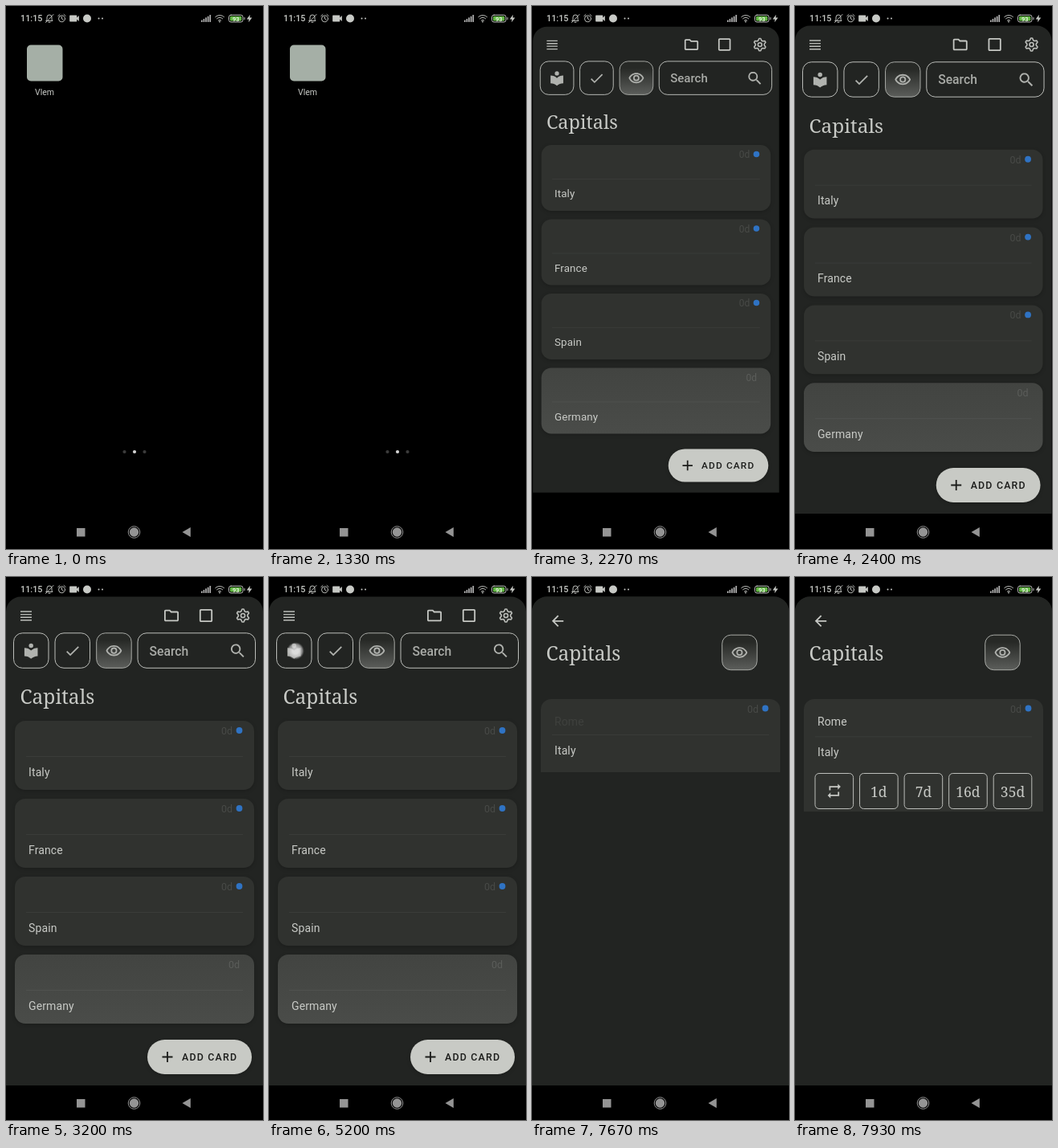
Recreate the animation shown at these times as an HTML page. Size 320x676 px, loop 8 s.

```html
<!DOCTYPE html>
<html lang="en">
<head>
<meta charset="utf-8">
<title>Flash cards</title>
<style>
html, body { margin: 0; height: 100%; overflow: hidden; background: #000; }
svg { display: block; width: 100vw; height: 100vh; font-family: Roboto, sans-serif; fill: #c8cac6; }
.slab { font-family: "Noto Serif", serif; font-weight: 300; }
.line { fill: none; stroke: #bcbeba; }
</style>
</head>
<body>
<svg id="stage" viewBox="0 0 320 676"></svg>
<script>
const BG = '#222422', CARD = '#30322f', DIM = '#b0b2ae';
const PATHS = {
  folder: 'M9.17 6l2 2H20v10H4V6h5.17M10 4H4c-1.1 0-2 .9-2 2v12c0 1.1.9 2 2 2h16c1.1 0 2-.9 2-2V8c0-1.1-.9-2-2-2h-8l-2-2z',
  square: 'M19 5v14H5V5h14m0-2H5c-1.1 0-2 .9-2 2v14c0 1.1.9 2 2 2h14c1.1 0 2-.9 2-2V5c0-1.1-.9-2-2-2z',
  book: 'M12 11.55C9.64 9.35 6.48 8 3 8v11c3.48 0 6.64 1.35 9 3.55 2.36-2.19 5.52-3.55 9-3.55V8c-3.48 0-6.64 1.35-9 3.55zM12 8a3 3 0 1 0 0-6 3 3 0 0 0 0 6z',
  check: 'M9 16.17L4.83 12l-1.42 1.41L9 19 21 7l-1.41-1.41z',
  eye: 'M12 6c3.79 0 7.17 2.13 8.82 5.5C19.17 14.87 15.79 17 12 17s-7.17-2.13-8.82-5.5C4.83 8.13 8.21 6 12 6m0-2C7 4 2.73 7.11 1 11.5 2.73 15.89 7 19 12 19s9.27-3.11 11-7.5C21.27 7.11 17 4 12 4zm0 5a2.5 2.5 0 0 1 0 5 2.5 2.5 0 0 1 0-5m0-2a4.5 4.5 0 0 0 0 9 4.5 4.5 0 0 0 0-9z',
  search: 'M15.5 14h-.79l-.28-.27A6.5 6.5 0 1 0 13.73 14.43l.27.28v.79l5 4.99L20.49 19zm-6 0a4.5 4.5 0 1 1 0-9 4.5 4.5 0 0 1 0 9z',
  repeat: 'M7 7h10v3l4-4-4-4v3H5v6h2V7zm10 10H7v-3l-4 4 4 4v-3h12v-6h-2v4z',
  back: 'M20 11H7.83l5.59-5.59L12 4l-8 8 8 8 1.41-1.41L7.83 13H20z',
  video: 'M17 10.5V7c0-.55-.45-1-1-1H4c-.55 0-1 .45-1 1v10c0 .55.45 1 1 1h12c.55 0 1-.45 1-1v-3.5l4 4v-11z',
  bolt: 'M14 2L5 14h6l-1 8 9-12h-6z'
};

const icon = (name, x, y, scale = 0.9, fill = '#c6c8c4') =>
  `<path d="${PATHS[name]}" fill="${fill}" fill-rule="evenodd" transform="translate(${x} ${y}) scale(${scale}) translate(-12 -12)"/>`;
const text = (str, x, y, size, extra = '') =>
  `<text x="${x}" y="${y}" font-size="${size}" ${extra}>${str}</text>`;
const box = (x, y, w, h, r, extra = 'class="line"') =>
  `<rect x="${x}" y="${y}" width="${w}" height="${h}" rx="${r}" ${extra}/>`;
const circle = (x, y, r, extra = '') => `<circle cx="${x}" cy="${y}" r="${r}" ${extra}/>`;
const eyeButton = (x, y) => box(x, y, 43.5, 43.5, 11, 'fill="url(#glow)" stroke="#a8aaa6"') +
  icon('eye', x + 21.7, y + 22.3, 0.9, DIM);
const due = (y, dot) => text('0d', dot ? 268 : 277, y, 12.5, `fill="${dot ? '#484a47' : '#5b5d5a'}"`) +
  (dot ? circle(290.5, y - 5, 3.9, 'fill="#2f73c4"') : '');
const label = (str, y) => text(str, 28, y, 14, 'letter-spacing=".12"');
const divider = (y, color = '#3a3c39') => `<path d="M25 ${y}H295" stroke="${color}"/>`;
const panel = `<path d="M0 633V43a18.5 18.5 0 0 1 18.5-18.5H301.5a18.5 18.5 0 0 1 18.5 18.5V633z" fill="${BG}"/>`;

function listCard(name, i) {
  const y = 179 + 97 * i, last = i === 3;
  return box(11, y, 298, 86, 13, `fill="${last ? 'url(#lit)' : CARD}" filter="url(#shade)"`) +
    divider(y + 44.5, last ? '#50524f' : undefined) + due(y + 17, !last) + label(name, y + 68.5);
}

function gear(x, y) {
  const teeth = [...Array(24).keys()].map(i => {
    const a = i * Math.PI / 12 - Math.PI / 24, r = i % 4 < 2 ? 9.8 : 7;
    return `${Math.sin(a) * r},${-Math.cos(a) * r}`;
  }).join(' ');
  return `<g transform="translate(${x} ${y}) scale(.82)" class="line" stroke-width="2" stroke-linejoin="round">
    <polygon points="${teeth}"/>${circle(0, 0, 3.1)}</g>`;
}

const statusBar = text('11:15', 18, 19.2, 10.8, 'font-weight="500"') +
  `<g class="line" stroke-linecap="round">
    <path d="M50 18.5h8l-1-1.5v-3a3 3 0 0 0-6 0v3zM53 20.3h2M49.5 20.5l9.5-10"/>
    ${circle(69.5, 15.8, 4)}<path d="M69.5 13.5v2.5l1.7 1M64.8 12.5l2.2-2M74.2 12.5l-2.2-2"/>
    <path d="M260.7 13.6a7.6 7.6 0 0 1 10.8 0M262.5 15.8a5 5 0 0 1 7.2 0M264.4 18a2.4 2.4 0 0 1 3.4 0"/>
    ${box(277.5, 11.2, 17.5, 8.8, 2.6)}<path d="M297 14.5v2.2"/>
  </g>` + circle(266, 19.5, 0.9) + icon('video', 85, 15.5, 0.65) + circle(101, 15.5, 5) +
  circle(115.5, 15.5, 1) + circle(120, 15.5, 1) +
  [0, 1, 2, 3, 4].map(i => box(243 + i * 2.6, 17.5 - i * 1.6, 1.7, 2.5 + i * 1.6, 0.4, 'fill="#b4b4b4"')).join('') +
  box(279, 12.7, 14.3, 5.8, 1.2, 'fill="#62b843"') +
  text('93', 286.2, 18.5, 7.5, 'text-anchor="middle" font-weight="700" fill="#dfeeda"') +
  icon('bolt', 303, 15.5, 0.48);

const navBar = '<path d="M0 633H320V676H0z" fill="#000"/><g fill="#949494">' +
  box(88, 650, 10.5, 10.5, 0, '') + circle(159.5, 655, 5.7) +
  circle(159.5, 655, 7.3, 'fill="none" stroke="#949494"') + '<path d="M219.5 655L229.8 649V661z"/></g>';

const home = box(26, 48.5, 44.5, 45, 5, 'fill="#a5afa6"') +
  text('Vlem', 48, 111, 10.5, 'text-anchor="middle"') +
  [147.5, 160, 172.5].map((x, i) => circle(x, 555, 2.1, `fill="${i === 1 ? '#d4d4d4' : '#3c3c3c'}"`)).join('');

const listPage = panel + `<path id="topFill" d="M0 0H320V60H0z" fill="${BG}"/>` +
  '<path class="line" stroke-width="1.4" d="M18 43h14M18 46.6h14M18 50.2h14M18 53.8h14"/>' +
  icon('folder', 206, 48) + icon('square', 249, 48) + gear(295, 48) +
  box(9.5, 69.8, 43.5, 43.5, 11) + icon('book', 31.2, 92, 0.92, DIM) +
  box(61, 69.8, 43.5, 43.5, 11) + icon('check', 82.8, 92, 0.9, DIM) + eyeButton(112.7, 69.8) +
  box(164, 69.8, 146.5, 43.5, 11) + text('Search', 178.5, 97.5, 15.7, 'font-weight="500" fill="#a9aba7"') +
  icon('search', 288.5, 92, 0.95, DIM) + text('Capitals', 17.5, 158, 24.5, 'class="slab"') +
  ['Italy', 'France', 'Spain', 'Germany'].map(listCard).join('') +
  box(176, 576, 130, 43, 21.5, 'fill="#c8cac5" filter="url(#shade)"') +
  '<path d="M194.5 597.5h13M201 591v13" stroke="#1b1c1a" stroke-width="1.8"/>' +
  text('ADD CARD', 219, 602, 12.4, 'font-weight="500" letter-spacing="1.2" fill="#1b1c1a"');

const answers = ['', '1d', '7d', '16d', '35d'].map((str, i) => {
  const x = 25 + i * 55.55;
  return box(x, 244.5, 47.6, 44, 5) + (str
    ? text(str, x + 23.8, 273.5, 17.5, 'class="slab" text-anchor="middle"')
    : icon('repeat', x + 23.8, 266.5));
}).join('');

const studyPage = `<rect y="43" width="320" height="590" fill="${BG}"/>` + panel + icon('back', 32, 54.8) +
  text('Capitals', 17.5, 104, 24.5, 'class="slab"') + eyeButton(236.7, 72.2) +
  `<g clip-path="url(#reveal)">
    <rect id="card" x="11" y="152" width="298" rx="13" fill="${CARD}"/>
    ${due(168.5, true)}
    <g id="question">${divider(196.3)}${label('Italy', 220.3)}</g>
    <g id="answer">${label('Rome', 185)}${answers}</g>
  </g>`;

const $ = id => document.getElementById(id);
$('stage').innerHTML = `<defs>
  <linearGradient id="glow" x2="0" y2="1"><stop offset=".2" stop-color="#272926"/><stop offset="1" stop-color="#5c5e5b"/></linearGradient>
  <linearGradient id="lit" x2="0" y2="1"><stop stop-color="#424441"/><stop offset="1" stop-color="#4a4c49"/></linearGradient>
  <radialGradient id="tap"><stop offset=".35" stop-color="#e4e4e4" stop-opacity=".85"/>
    <stop offset=".75" stop-color="#c4c4c4" stop-opacity=".65"/><stop offset="1" stop-color="#888" stop-opacity="0"/></radialGradient>
  <filter id="shade" color-interpolation-filters="sRGB"><feDropShadow dx="0" dy="1.5" stdDeviation="2" flood-opacity=".2"/></filter>
  <clipPath id="reveal"><rect id="window" x="0" y="150" width="320"/></clipPath>
</defs>
<g id="home">${home}</g><g id="list">${listPage}</g><g id="study">${studyPage}</g>
<circle id="touch" r="11" fill="url(#tap)"/>${navBar}${statusBar}`;

const set = (id, attrs) => { for (const k in attrs) $(id).setAttribute(k, attrs[k]); };
const ramp = (t, from, to) => Math.min(1, Math.max(0, (t - from) / (to - from)));
const mix = (a, b, p) => a + (b - a) * p;
const LOOP = 8000, FPS = 15;

function draw(t) {
  // The window springs open from the launcher icon.
  const s = Math.max(0, t - 2096) * 0.028;
  const open = 1 - (1 + s) * Math.exp(-s);
  const zoom = 1 - 0.12 * open;
  set('home', { transform: `translate(160 338) scale(${zoom}) translate(-160 -338)`, opacity: open < 0.9 ? 1 : 0 });
  set('list', {
    transform: `translate(${mix(23.3, 0, open)} ${mix(48, 0, open)}) scale(${mix(0.136, 1, open)} ${mix(0.042, 1, open)})`,
    opacity: open > 0 ? 1 : 0
  });
  set('topFill', { opacity: open < 0.85 ? 1 : 0 });

  // The study page flies in from the right.
  const fly = 1 - (1 - ramp(t, 5230, 5660)) ** 3;
  set('study', { transform: `translate(${(1 - fly) * 100} 0)`, opacity: fly });

  // The card unfolds to show its answer.
  const unfold = ramp(t, 7640, 7930);
  set('window', { height: unfold ? mix(88, 142, unfold) : 90 });
  set('card', { height: unfold ? 170 : 86 });
  set('question', { transform: `translate(0 ${2.5 * unfold})` });
  set('answer', { opacity: unfold });

  const first = t > 2060 && t < 2195, second = t > 5195 && t < 5330;
  set('touch', { cx: first ? 41.5 : 33, cy: first ? 80 : 92, opacity: first || second ? 1 : 0 });
}

function tick(now) {
  const step = Math.floor((now % LOOP + 4) * FPS / 1000);
  draw(step * 1000 / FPS % LOOP);
  requestAnimationFrame(tick);
}
draw(0);
requestAnimationFrame(tick);
</script>
</body>
</html>
```
